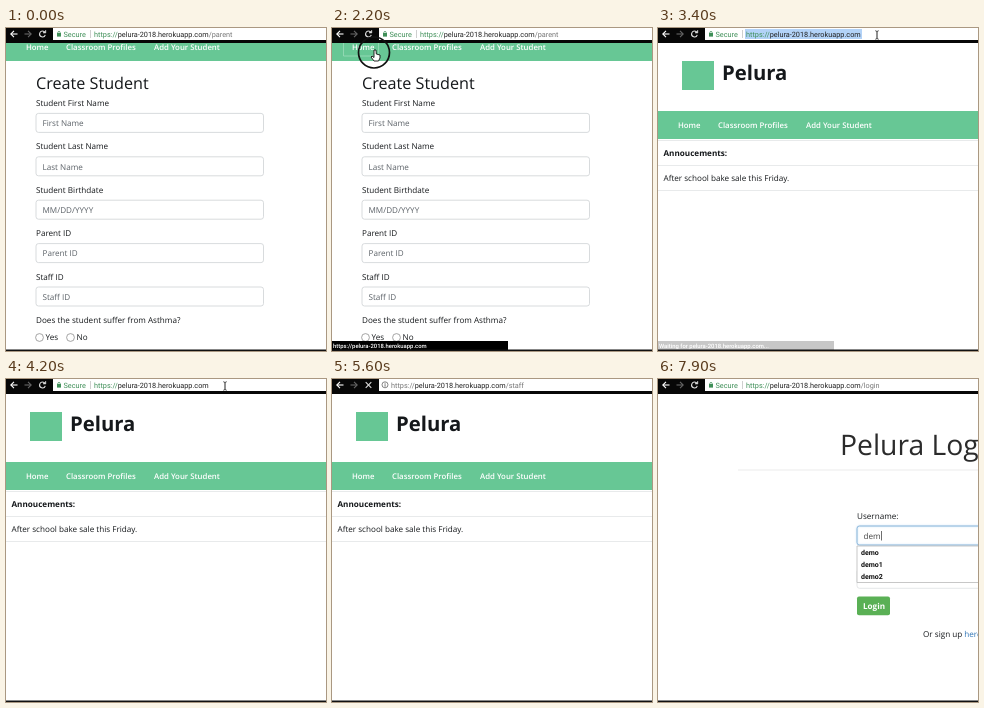
Animation of 320 by 323 pixels, one loop 8 s. Source, as an HTML page with a canvas:

```html
<!DOCTYPE html>
<html lang="en">
<head>
<meta charset="utf-8">
<title>School portal walkthrough</title>
<style>
html, body { margin: 0; width: 100%; height: 100%; overflow: hidden; background: #fff; }
canvas { display: block; }
</style>
</head>
<body>
<canvas id="stage"></canvas>
<script>
const W = 320, H = 323, LOOP = 8000;
const canvas = document.getElementById('stage'), c = canvas.getContext('2d');
const dpr = window.devicePixelRatio || 1;
canvas.width = W * dpr; canvas.height = H * dpr;
canvas.style.width = W + 'px'; canvas.style.height = H + 'px';
c.textRendering = 'geometricPrecision';

const PAGE = '"Open Sans", "Noto Sans", sans-serif';
const UI = 'Roboto, "Liberation Sans", sans-serif';
const GREEN = '#67c795', INK = '#15181b', SECURE = '#3f8f58';
const BRAND = 'Pelura', HOST = 'pelura-2018.herokuapp.com', SITE = 'https://' + HOST;

function rect(x, y, w, h, fill) { c.fillStyle = fill; c.fillRect(x, y, w, h); }

// Draws text and returns the x where it ends.
function text(s, x, y, size = 8.15, fill = INK, weight = 400, font = PAGE) {
  c.font = `${weight} ${size}px ${font}`;
  c.fillStyle = fill;
  c.fillText(s, x, y);
  return x + c.measureText(s).width;
}
const ui = (s, x, y, fill, size = 7.3, weight = 400) => text(s, x, y, size, fill, weight, UI);

function box(x, y, w, h, r, fill, stroke) {
  c.beginPath();
  c.roundRect(x, y, w, h, r);
  if (fill) { c.fillStyle = fill; c.fill(); }
  if (stroke) { c.strokeStyle = stroke; c.lineWidth = 0.8; c.stroke(); }
}

function line(points, stroke, width = 1, fill) {
  c.beginPath();
  points.forEach(([x, y], i) => i ? c.lineTo(x, y) : c.moveTo(x, y));
  if (fill) { c.closePath(); c.fillStyle = fill; c.fill(); }
  c.strokeStyle = stroke; c.lineWidth = width; c.stroke();
}

function ring(x, y, r, stroke, width, from = 0, to = Math.PI * 2) {
  c.beginPath();
  c.arc(x, y, r, from, to);
  c.strokeStyle = stroke; c.lineWidth = width; c.stroke();
}

function input(x, y, w, hint, border) {
  box(x, y, w, 19, 2.5, '#fff', border);
  text(hint, x + 6.5, y + 12.7, 8.15, '#5c6268');
}

function nav(y) {
  rect(0, y, W, 28, GREEN);
  [['Home', 20], ['Classroom Profiles', 60], ['Add Your Student', 148]]
    .forEach(([s, x]) => text(s, x, y + 17.3, 7.8, '#fff', 600));
}

function formPage(t) {
  nav(5);
  if (t >= 2100) box(11.5, 8.5, 35, 19.5, 0, null, '#9cdcba');
  text('Create Student', 30, 61, 16.2);
  const fields = [['Student First Name', 'First Name'], ['Student Last Name', 'Last Name'],
    ['Student Birthdate', 'MM/DD/YYYY'], ['Parent ID', 'Parent ID'], ['Staff ID', 'Staff ID']];
  fields.forEach(([label, hint], i) => {
    const y = 78 + i * 43.4;
    text(label, 30, y);
    input(30, y + 7.4, 227.5, hint, '#cfd2d5');
  });
  text('Does the student suffer from Asthma?', 30, 295);
  [['Yes', 33.5], ['No', 64.5]].forEach(([s, x]) => {
    ring(x, 309.5, 3.9, '#8d8d8d', 0.8);
    text(s, x + 6, 312);
  });
}

function homePage() {
  rect(24, 33, 32, 29, GREEN);
  text(BRAND, 64, 52, 20.3, INK, 700);
  nav(83);
  text('Annoucements:', 5.5, 128, 8.15, INK, 700);
  text('After school bake sale this Friday.', 5.5, 153);
  [112, 137, 162].forEach(y => rect(0, y, W, 0.8, '#e3e5e7'));
}

function loginPage(t) {
  text(BRAND + ' Login', 182, 76, 28.3, '#2b2b2b');
  rect(80, 90.6, W, 0.8, '#e6e6e6');
  text('Username:', 199, 139.5);
  const typed = 'dem'.slice(0, Math.max(0, Math.floor((t - 7500) / 100)));
  input(199, 147, 150, typed ? '' : 'Username', '#dfe1e3');
  text('Password:', 199, 183);
  input(199, 190.3, 150, 'Password', '#dfe1e3');
  if (t >= 7000) {
    c.save();
    c.globalAlpha = Math.min(1, (t - 6900) / 300);
    c.shadowColor = '#a5cff0'; c.shadowBlur = 2 * dpr;
    box(199, 147, 150, 19, 2.5, null, '#84b4dc');
    c.restore();
    const end = typed ? text(typed, 205.5, 159.8, 8.15, '#444') : 205.5;
    rect(end + 0.5, 152, 0.7, 9.5, '#333');
  }
  box(199, 217.6, 33, 18.6, 2, '#5ab055');
  text('Login', 205, 230, 8.15, '#fff', 700);
  const end = text('Or sign up ', 265, 257.5);
  text('here', end, 257.5, 8.15, '#2f74b5');
  if (typed) {
    box(199, 167, 150, 36.5, 0, '#fff', '#b9b9b9');
    ['demo', 'demo1', 'demo2'].forEach((s, i) => ui(s, 203, 176 + i * 12.1, '#111', 7, 700));
  }
}

function suggestions(typed) {
  rect(0, 12, W, 58, '#303030');
  rect(0, 17.5, W, 13, '#4b4b4b');
  [['/staff', BRAND], ['/staff-home', BRAND], [typed, 'Quorby Search'], ['/staff/student', BRAND]]
    .forEach(([path, label], i) => {
      const y = 26.5 + i * 12.7, search = i === 2, fill = search ? '#fff' : '#78a9f5';
      let x = ui(SITE + typed, 59, y, fill, 7.1, 700);
      x = ui(path.slice(typed.length), x, y, fill);
      ui(' - ' + label, x, y, '#a9a9a9');
      if (search) {
        ring(52.5, y - 3.2, 1.9, '#ddd', 0.9);
        line([[54, y - 1.6], [55.8, y + 0.4]], '#ddd');
      } else pageIcon(50.8, y - 6, '#ddd');
    });
}

function pageIcon(x, y, stroke) {
  line([[x, y], [x + 2.6, y], [x + 4.2, y + 1.8], [x + 4.2, y + 6.2], [x, y + 6.2], [x, y]], stroke, 0.8);
}

function toolbar(t) {
  const loading = t >= 2300 && t < 2700 || t >= 5300 && t < 5900;
  const editing = t >= 4400 && t < 5300, insecure = t >= 5300 && t < 5900;
  rect(0, 0, W, 15, '#070707');
  rect(47, 0, W, 12, '#fff');
  line([[11.5, 6], [5, 6]], '#fff', 1.1);
  line([[8, 2.8], [4.8, 6], [8, 9.2]], '#fff', 1.1);
  line([[18.5, 6], [25, 6]], '#666', 1.1);
  line([[22, 2.8], [25.2, 6], [22, 9.2]], '#666', 1.1);
  if (loading) {
    line([[33.7, 3.2], [39.3, 8.8]], '#ddd', 1.1);
    line([[39.3, 3.2], [33.7, 8.8]], '#ddd', 1.1);
  } else {
    ring(36.5, 6, 2.9, '#ddd', 1.1, 0.3, 5.4);
    line([[39.8, 2.2], [39.8, 5], [37, 5]], '#ddd', 0.5, '#ddd');
  }

  let x = 59;
  if (editing) pageIcon(51, 2.7, '#666');
  else if (insecure) {
    ring(53, 5.8, 3, '#666', 0.8);
    rect(52.6, 5.2, 0.9, 2.5, '#666');
    rect(52.6, 3.8, 0.9, 0.9, '#666');
  } else {
    rect(51, 5, 4, 3.6, SECURE);
    ring(53, 4.8, 1.3, SECURE, 0.8, Math.PI, 0);
    ui('Secure', 57.5, 8.6, SECURE);
    rect(84, 2, 0.7, 8, '#bbb');
    x = 88;
  }

  const path = t < 2500 ? '/parent' : t < 4400 ? '' : editing ? typedPath(t) : insecure ? '/staff' : '/login';
  if (t >= 3300 && t < 3700) rect(87, 1, 117, 10, '#b3d3f8');
  x = ui('https://', x, 8.6, editing || insecure ? '#777' : SECURE);
  x = ui(HOST, x, 8.6, '#222');
  x = ui(path, x, 8.6, editing ? '#222' : '#777');
  if (editing) {
    const rest = t >= 4600 ? '/staff'.slice(path.length) : '';
    rect(x, 1, c.measureText(rest).width, 10, '#a8cdf8');
    ui(rest, x, 8.6, '#222');
  }
  if (editing || t >= 3700 && t < 4200) rect(x + 0.2, 1.5, 0.6, 9, '#222');
  if (editing) suggestions(path);
}

function typedPath(t) {
  const keys = [4400, 4600, 4800, 4900, 5000, 5200];
  return '/staff'.slice(0, keys.filter(k => t >= k).length);
}

function status(t) {
  if (t < 1900 || t >= 3600) return;
  c.globalAlpha = t < 3300 ? 1 : t < 3400 ? 0.6 : 0.22;
  rect(0, 313, 176, 9, '#000');
  c.globalAlpha = 1;
  ui(t < 2300 ? SITE : `Waiting for ${HOST}...`, 1, 319.6, '#fff', 5.9, 500);
}

// Pointer stops: time, x, y; null hides it.
const stops = [[100, 227, 275], [900, 43, 6], [1300, 9, 5], [1700, 24, 8], [1900, 43, 22],
  [2600, 43, 22], [3300, 219, 7], [4400, null], [6500, 200, 78], [6800, 241.5, 156], [7600, null]];

function pointer(t) {
  const i = stops.findLastIndex(s => t >= s[0]);
  if (i < 0 || stops[i][1] === null) return;
  const a = stops[i], b = stops[i + 1][1] === null ? a : stops[i + 1];
  const u = (t - a[0]) / (stops[i + 1][0] - a[0]), k = u * u * (3 - 2 * u);
  const x = a[1] + (b[1] - a[1]) * k, y = a[2] + (b[2] - a[2]) * k;
  const overHome = t >= 1900 && t <= 2600;
  if (t >= 2100 && t < 2500) ring(42, 24.5, 15.5, '#111', 1.7);
  c.save();
  c.translate(x, y);
  if (overHome) {
    line([[-1, 0], [1, 0], [1.3, 4], [5, 5], [5, 8], [3.5, 11], [-1, 11], [-4, 7], [-3, 6], [-1, 7.5]],
      '#111', 0.9, '#fff');
  } else if (t >= 3200 && t < 4400 || t >= 6800) {
    line([[0, -3.5], [0, 3.5]], '#222', 1);
    line([[-1.7, -4.3], [0, -3.5], [1.7, -4.3]], '#222', 0.8);
    line([[-1.7, 4.3], [0, 3.5], [1.7, 4.3]], '#222', 0.8);
  } else {
    line([[0, 0], [0, 9], [2.1, 7.2], [3.5, 10.3], [5, 9.6], [3.6, 6.6], [6.4, 6.4]], '#fff', 0.8, '#111');
  }
  c.restore();
}

function draw(now) {
  const t = Math.floor(now % LOOP / 100) * 100;
  c.setTransform(dpr, 0, 0, dpr, 0, 0);
  rect(0, 0, W, H, '#fff');
  if (t < 2500) formPage(t);
  else if (t < 5900) homePage();
  else loginPage(t);
  status(t);
  rect(0, 321.5, W, 1.5, '#111');
  toolbar(t);
  pointer(t);
}

function tick() {
  draw(performance.now());
  requestAnimationFrame(tick);
}
tick();
</script>
</body>
</html>
```
